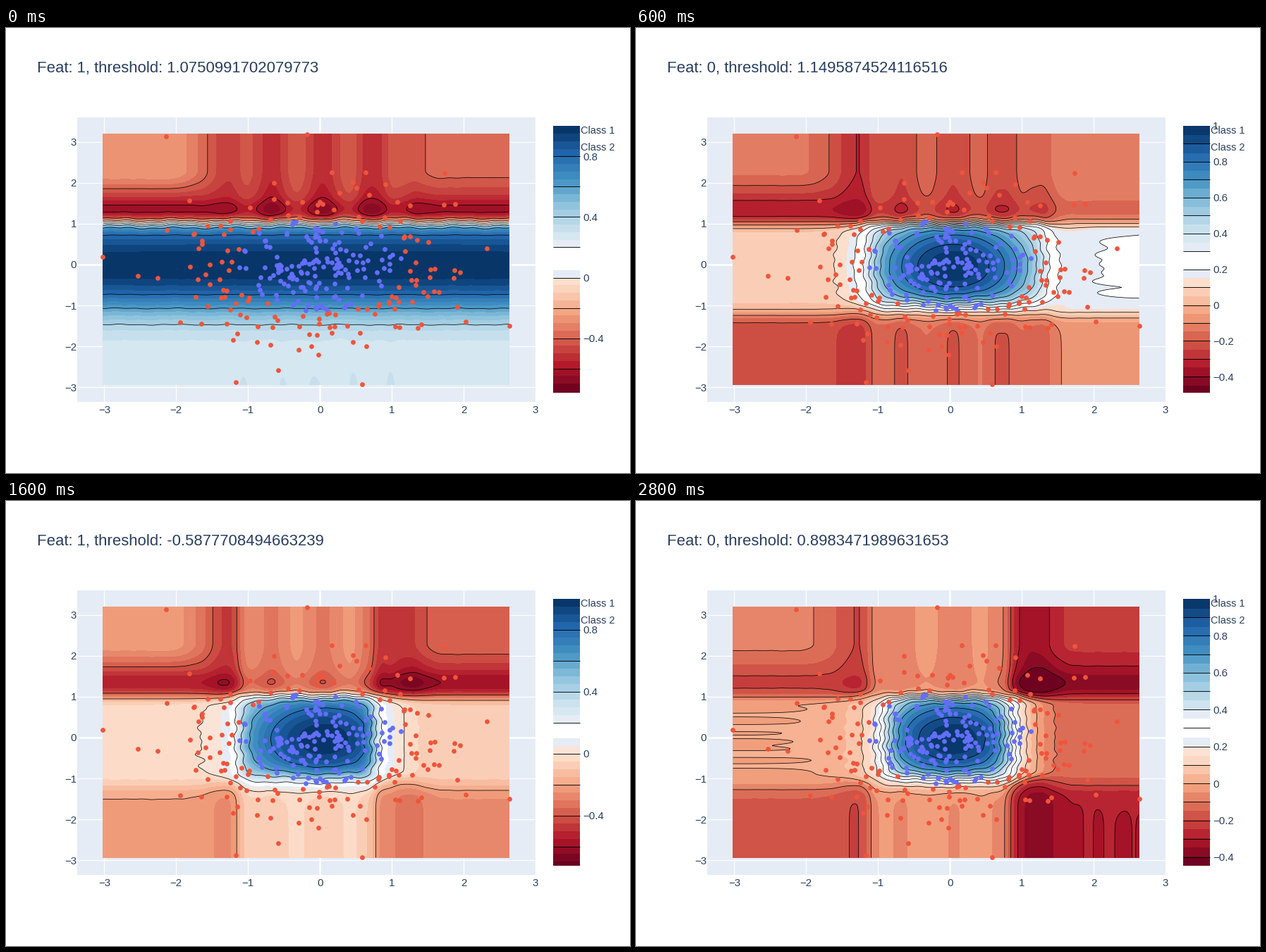
A matplotlib script that plays this animation: 885x632 px, repeating every 3 s.

```python
import math

import matplotlib.pyplot as plt
import numpy as np
from matplotlib.animation import FuncAnimation
from matplotlib.patches import Rectangle

W, H, DPI = 885, 632, 64
PT = 72 / DPI                      # points per pixel
INK = "#2a3f5f"
PANEL = "#E5ECF6"
RED, BLUE = "#EF553B", "#636EFA"
CX, CY, SX, SY = 445.2, 336.0, 101.95, 58.15
HEAT = (137, 714, 507, 150)        # left, right, bottom, top
BAR = (776, 814, 518, 139)
FILL_STEP = 0.05
CORE = 0.12                        # score just outside the hill

TITLES = [
    (1, "1.0750991702079773"), (0, "-1.0815710425376892"),
    (1, "-1.0654417872428894"), (0, "1.1495874524116516"),
    (0, "-1.0815710425376892"), (0, "1.1495874524116516"),
    (0, "0.6966709494590759"), (1, "1.0750991702079773"),
    (1, "-0.5877708494663239"), (1, "-1.0654417872428894"),
    (0, "1.1495874524116516"), (0, "-1.0815710425376892"),
    (0, "-1.0815710425376892"), (0, "0.8983471989631653"),
    (0, "0.8983471989631653"),
]

# step: lowest score, votes (left, right, top, bottom),
#       hill edges (left, right) and their softness
STAGES = {
    0: (-.758, (0, 0, -.64, .18), (-99, 99), 1),
    2: (-.370, (.11, .11, -.39, -.36), (-1.5, 1.45), .2),
    4: (-.608, (-.22, .07, -.31, -.24), (-1.1, 1.35), .07),
    6: (-.512, (-.19, -.21, -.26, -.20), (-1.12, .75), .05),
    8: (-.723, (-.15, -.20, -.42, -.18), (-1.12, .76), .06),
    10: (-.391, (-.04, -.18, -.23, -.19), (-1.1, .9), .1),
    14: (-.446, (-.12, -.26, -.18, -.16), (-.92, .85), .1),
}

# The samples that set the limits of the map, in data units.
EXTREMES = [(-3.02, .19), (2.64, -1.5), (-.18, 3.18), (.59, -2.93),
            (-2.14, 3.13), (-.58, -2.58), (2.32, .4), (-1.17, -2.87),
            (-2.53, -.28), (1.73, 2.23)]

rng = np.random.default_rng(7)
px = np.arange(HEAT[0], HEAT[1]) + .5
py = np.arange(HEAT[3], HEAT[2]) + .5
gx = (px - CX) / SX
gy = (CY - py) / SY
X, Y = np.meshgrid(gx, gy)


def sig(v):
    return 1 / (1 + np.exp(-np.clip(v, -60, 60)))


def ramp(v, a, b):
    t = np.clip((v - a) / (b - a), 0, 1)
    return t * t * (3 - 2 * t)


def bump(v, center, width):
    return np.exp(-((v - center) / width) ** 2)


def streaks(v, n=7):
    freq = rng.uniform(6, 30, n)
    phase = rng.uniform(0, 2 * math.pi, n)
    return np.sin(np.outer(v, freq) + phase).sum(axis=1) / math.sqrt(n)


middle = 1 - ramp(np.abs(Y), .8, 1.2)
above = sig((Y - .98) / .07)
below = sig((-1.22 - Y) / .1)
ripple = np.cos(2 * math.pi * (X - .03) / .7) * np.exp(-(X / 1.3) ** 4)
fade = 1 - ramp(Y, 1.45, 2.3) * (
    .08 + .42 * ramp(-X, 1.2, 2.1) + .18 * ramp(X, .8, 1.6))
ridge = 1 + .2 * bump(Y, 1.33, .25)
grain = (.006 * (1 - middle) * bump(X, 0, 1.6) * streaks(gx)
         + .006 * middle * ramp(np.abs(X), 1.1, 1.6) * streaks(gy)[:, None])
WX = X + .015 * (np.sin(9 * Y + 3 * X) + np.sin(19 * Y - 5 * X + 1))
WY = Y + .02 * (np.sin(8 * X + 2) + .8 * np.sin(21 * X + 4 * Y))


def field(low, votes, edges, soft):
    left, right, top, bottom = votes
    xl, xr = edges
    west = sig((-1.12 - .25 * middle - X) / (.05 + .16 * middle))
    east = sig((X - xr - .35 * middle) / (.05 + .1 * middle))
    shoulder = .35 * (1 - middle) * (
        min(left, 0) * bump(X, -1.3, .3) + min(right, 0) * bump(X, 1.2, .3))
    base = (CORE + left * west + right * east + shoulder
            + (top * above + min(bottom, 0) * below) * (1 + .1 * ripple)
            + max(bottom, 0) * below)
    base = base * fade * ridge + grain

    # With no cut from below the hill slopes away gently.
    yb, wb = (-.99, .1) if bottom < 0 else (-1.6, .3)
    inside = (sig((WX - xl) / soft) * sig((xr - WX) / soft)
              * sig((WY - yb) / wb) * sig((.99 - WY) / .06))
    dome = np.exp(-((X - .05) / max(1.1, xr / 3)) ** 2 / 2
                  - ((Y + .04) / 1.17) ** 2 / 2)
    return np.clip(base + (dome - base) * inside, low, 1)


KEYS = sorted(STAGES)
FIELDS = [field(*STAGES[k]) for k in KEYS]
LOWS = [STAGES[k][0] for k in KEYS]


def blend(i):
    pos = np.interp(i, KEYS, range(len(KEYS)))
    a = int(pos)
    b = min(a + 1, len(KEYS) - 1)
    w = pos - a
    return ((1 - w) * FIELDS[a] + w * FIELDS[b],
            (1 - w) * LOWS[a] + w * LOWS[b])


cmap = plt.get_cmap("RdBu")


def shade(v, low):
    mid = (np.floor(v / FILL_STEP) + .5) * FILL_STEP
    t = np.clip((mid - low) / (1 - low), 0, 1)
    rgb = cmap(t)[..., :3]
    rgb[(t > .445) & (t < .57)] = (229 / 255, 236 / 255, 246 / 255)
    rgb[(t > .472) & (t < .542)] = 1
    return rgb


fig = plt.figure(figsize=(W / DPI, H / DPI), dpi=DPI, facecolor="white")
ax = fig.add_axes([0, 0, 1, 1])
ax.set_xlim(0, W)
ax.set_ylim(H, 0)
ax.axis("off")


def label(x, y, s, size=15, ha="left"):
    return ax.text(x, y, s, fontsize=size * PT, ha=ha, va="baseline",
                   color=INK, family="Liberation Sans", zorder=6)


def number(v):
    return f"{v:.2g}".replace("-", "\u2212")


def line(xs, ys, color, width, z):
    return ax.plot(xs, ys, color=color, lw=width * PT, zorder=z,
                   solid_capstyle="butt")[0]


def dots(pts, color):
    ax.scatter(CX + pts[:, 0] * SX, CY - pts[:, 1] * SY, s=(6.8 * PT) ** 2,
               c=color, linewidths=0, zorder=4)


def picture(box):
    return ax.imshow(np.ones((2, 2, 3)), extent=box, aspect="auto",
                     interpolation="nearest", zorder=2)


ax.add_patch(Rectangle((101, 126.5), 650, 404, fc=PANEL, lw=0, zorder=0))
for n in range(-3, 4):
    x, y = CX + n * SX, CY - n * SY
    wide = 2.5 if n == 0 else 1.3
    line([x, x], [126.5, 530.5], "white", wide, 1)
    line([101, 751], [y, y], "white", wide, 1)
    label(x, 547.3, number(n), ha="center")
    label(100, y + 5.4, number(n), ha="right")
label(815, 150.3, "Class 1", 14.5)
label(815, 174.3, "Class 2", 14.5)
title = label(44, 63, "", 22.1)

# Gaussian samples, split into two classes by distance from the middle.
cloud = rng.normal(size=(4000, 2))
radius = np.hypot(cloud[:, 0], cloud[:, 1])
dots(cloud[radius < 1.16][:150], BLUE)
dots(cloud[(radius > 1.19) & (radius < 2.5)][:140], RED)
dots(np.array(EXTREMES), RED)

heat = picture(HEAT)
bar = picture(BAR)
moving = []


def update(i):
    while moving:
        moving.pop().remove()
    z, low = blend(i)
    step = .1 if low > -.5 else .2
    ticks = np.arange(math.ceil(low / step), round(1 / step) + 1)

    title.set_text("Feat: {}, threshold: {}".format(*TITLES[i]))
    heat.set_data(shade(z, low))
    scale = np.linspace(1, low, BAR[2] - BAR[3])
    bar.set_data(shade(scale[:, None], low))
    moving.append(ax.contour(px, py, z, levels=ticks[:-1] * step,
                             colors="black", linestyles="solid",
                             linewidths=.75 * PT, zorder=3))
    for k in ticks:
        y = BAR[3] + (1 - k * step) / (1 - low) * (BAR[2] - BAR[3])
        if k < ticks[-1]:
            moving.append(line(BAR[:2], [y, y], "black", .9, 5))
        if k % 2 == 0:
            moving.append(label(818, y + 5.4, number(k * step)))
    return []


anim = FuncAnimation(fig, update, frames=15, init_func=lambda: [],
                     interval=200, repeat=True, repeat_delay=0, blit=False)
plt.show()
```
